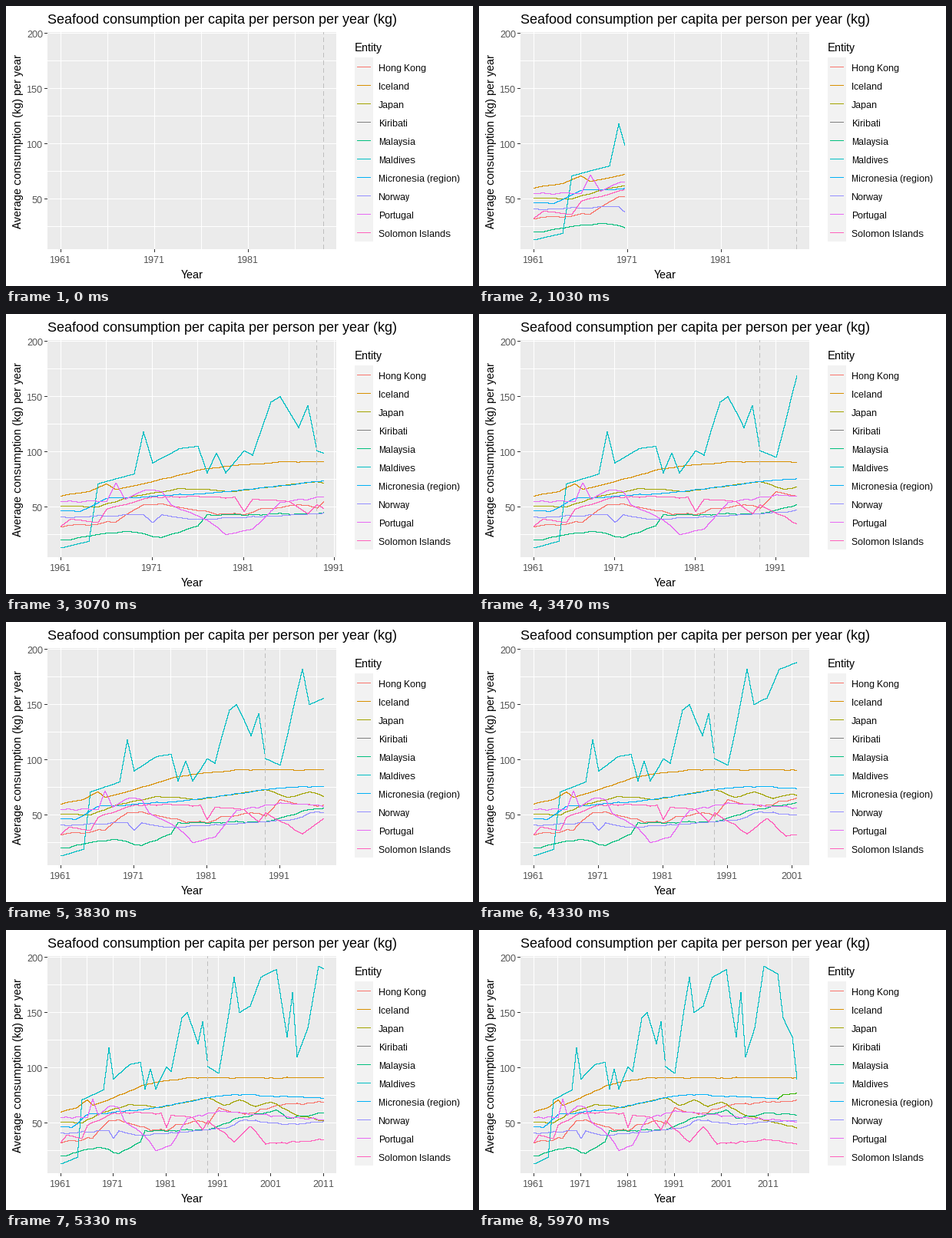
Write a matplotlib script that moves like this. It is 608x365 px and loops after 10000 ms.

```python
import numpy as np
import matplotlib.pyplot as plt
from matplotlib.animation import FuncAnimation
from matplotlib.patches import Rectangle

WIDTH, HEIGHT, DPI = 608, 365, 64
PX = 72 / DPI
LEFT, RIGHT, TOP, BOTTOM = 54, 430, 34, 317
FIRST_YEAR, MARK_YEAR, LAST_YEAR = 1961, 1989, 2017
LOOP_MS, INTERVAL = 10000, 20
LAST_STEP = 179  # thirty steps a second, then a pause

plt.rcParams.update({
    "font.family": "Liberation Sans",
    "text.hinting": "default",
    "text.hinting_factor": 1,
})
rng = np.random.default_rng(7)

fig = plt.figure(figsize=(WIDTH / DPI, HEIGHT / DPI), dpi=DPI, facecolor="white")
ax = fig.add_axes([0, 0, 1, 1])
ax.set(xlim=(0, WIDTH), ylim=(HEIGHT, 0))
ax.axis("off")


def centre(v):
    """Middle of the nearest pixel."""
    return np.floor(np.asarray(v) + 0.5) + 0.5


def y_pos(kg):
    return 323.2 - 1.44 * np.asarray(kg, float)


def x_pos(year, span):
    inner = (RIGHT - LEFT) / 1.1
    return LEFT + 0.05 * inner + inner * (year - FIRST_YEAR) / span


def box(x0, y0, x1, y1, color):
    ax.add_patch(Rectangle((x0, y0), x1 - x0, y1 - y0, fc=color, lw=0,
                           aa=False, snap=False, zorder=0))


def line(xs, ys, color, z=1, **kw):
    return ax.plot(xs, ys, color=color, lw=PX, aa=False, snap=False, zorder=z,
                   solid_capstyle="butt", solid_joinstyle="miter", **kw)[0]


def text(x, y, s, size, color="black", **kw):
    return ax.text(x, y, s, fontsize=size * PX, color=color,
                   va="baseline", **kw)


def trend(wobble, *points):
    """Yearly kg through (years since start, kg) turning points, with noise between."""
    t, kg = zip(*points)
    years = np.arange(t[-1] + 1)
    noise = rng.uniform(-wobble, wobble, len(years))
    noise[list(t)] = 0
    return np.interp(years, t, kg) + noise


hong_kong = trend(1.2, (0, 32), (6, 36.5), (9, 52), (11, 53), (17, 43.5), (20, 43),
                  (22, 49), (26, 52), (28, 49), (30, 64), (35, 58), (41, 66), (56, 71))
iceland = trend(0.5, (0, 60), (3, 64), (5, 71), (6, 66), (10, 73), (16, 85),
                (24, 91), (56, 91))
japan = trend(0.6, (0, 51), (4, 50), (7, 58), (13, 67), (19, 64), (28, 73),
              (31, 66), (34, 71), (37, 65), (40, 69), (45, 57), (56, 45.5))
micronesia = trend(0.5, (0, 47), (2, 46), (5, 58), (9, 59), (18, 64), (28, 73),
                   (33, 76), (47, 73), (52, 72))
kiribati = np.append(micronesia, np.linspace(75.5, 77, 4))
malaysia = trend(1, (0, 20), (7, 28), (11, 22.5), (15, 33), (16, 43), (28, 44),
                 (34, 55), (41, 62), (43, 54), (50, 59), (56, 57))
maldives = trend(0, (0, 13), (3, 19), (4, 71), (8, 80), (9, 118), (10, 90), (13, 103),
                 (15, 105), (16, 81), (17, 99), (18, 81), (20, 101), (21, 97),
                 (23, 145), (24, 150), (26, 122), (27, 142), (28, 101), (30, 95),
                 (33, 182), (34, 150), (36, 156), (38, 182), (41, 189), (43, 128),
                 (44, 168), (45, 110), (47, 136), (49, 192), (52, 185), (53, 145),
                 (55, 128), (56, 90))
norway = trend(0.8, (0, 41), (9, 43), (10, 36), (11, 43), (15, 39), (31, 45),
               (35, 53), (42, 49), (56, 52))
portugal = trend(1, (0, 55), (5, 55), (6, 72), (7, 57), (9, 65), (11, 64), (12, 52),
                 (16, 38), (18, 25), (21, 30), (24, 54), (30, 61), (37, 58), (56, 51))
solomon = trend(1, (0, 33), (1, 39), (4, 36), (5, 48), (10, 59), (19, 59), (20, 46),
                (21, 57), (25, 55), (27, 44), (28, 52), (33, 33), (36, 47), (39, 31),
                (50, 35), (56, 31))

SERIES = [
    ("Hong Kong", "#F8766D", hong_kong),
    ("Iceland", "#D89000", iceland),
    ("Japan", "#A3A500", japan),
    ("Kiribati", "#39B600", kiribati),
    ("Malaysia", "#00BF7D", malaysia),
    ("Maldives", "#00BFC4", maldives),
    ("Micronesia (region)", "#00B0F6", micronesia),
    ("Norway", "#9590FF", norway),
    ("Portugal", "#E76BF3", portugal),
    ("Solomon Islands", "#FF62BC", solomon),
]

# Panel, horizontal grid and fixed labels
box(LEFT, TOP, RIGHT, BOTTOM, "#EBEBEB")
for kg in range(25, 201, 25):
    y = centre(y_pos(kg))
    line([LEFT, RIGHT], [y, y], "white")
    if kg % 50 == 0:
        line([LEFT - 4, LEFT], [y, y], "#333333")
        text(48, y + 5.5, str(kg), 12, "#4D4D4D", ha="right")

text(LEFT, 23, "Seafood consumption per capita per person per year (kg)", 18)
text((LEFT + RIGHT) / 2, 355, "Year", 15, ha="center")
text(20, 176, "Average consumption (kg) per year", 15, ha="center",
     rotation=90, rotation_mode="anchor")

# Legend
text(454, 59, "Entity", 15)
box(454, 67, 478, 307, "#F2F2F2")
for row, (name, color, _) in enumerate(SERIES):
    y = 79.5 + 24 * row
    line([457, 475], [y, y], "#7F7F7F" if name == "Kiribati" else color)
    text(485, y + 5.5, name, 12)

# Moving parts
curves = [line([], [], color, z=3, drawstyle="steps-post") for _, color, _ in SERIES]
marker = line([], [], "#BEBEBE", z=4, dashes=(5, 4), dash_capstyle="butt")
grid = {year: line([], [], "white", z=2) for year in range(1961, 2018, 5)}
ticks = {year: (line([], [], "#333333"),
                text(0, 335, str(year), 12, "#4D4D4D", ha="center"))
         for year in range(1961, 2018, 10)}


def update(frame):
    step = min(LAST_STEP, int((frame + 0.5) * INTERVAL * 0.03 + 0.15))
    elapsed = (LAST_YEAR - FIRST_YEAR) * step / LAST_STEP
    span = max(MARK_YEAR - FIRST_YEAR, elapsed)

    for year, rule in grid.items():
        x = x_pos(year, span)
        visible = x <= RIGHT
        rule.set_visible(visible)
        rule.set_data([centre(x)] * 2, [TOP, BOTTOM])
        if year in ticks:
            tick, label = ticks[year]
            tick.set_visible(visible)
            label.set_visible(visible)
            tick.set_data([centre(x)] * 2, [BOTTOM, BOTTOM + 4])
            label.set_x(round(x))

    marker.set_data([centre(x_pos(MARK_YEAR, span))] * 2, [BOTTOM, TOP])

    for curve, (_, _, values) in zip(curves, SERIES):
        years = np.arange(len(values))
        end = min(elapsed, years[-1])
        shown = np.append(years[years < end], end)
        xs = centre(x_pos(FIRST_YEAR + shown, span))
        ys = y_pos(np.interp(shown, years, values))
        # One sample per pixel column keeps the stroke a single hard pixel wide
        columns = np.arange(xs[0], xs[-1] + 1)
        curve.set_data(columns, centre(np.interp(columns, xs, ys)))
    return [*curves, marker]


anim = FuncAnimation(fig, update, frames=LOOP_MS // INTERVAL, interval=INTERVAL,
                     init_func=lambda: update(0), repeat=True, repeat_delay=0,
                     blit=False, cache_frame_data=False)
plt.show()
```
